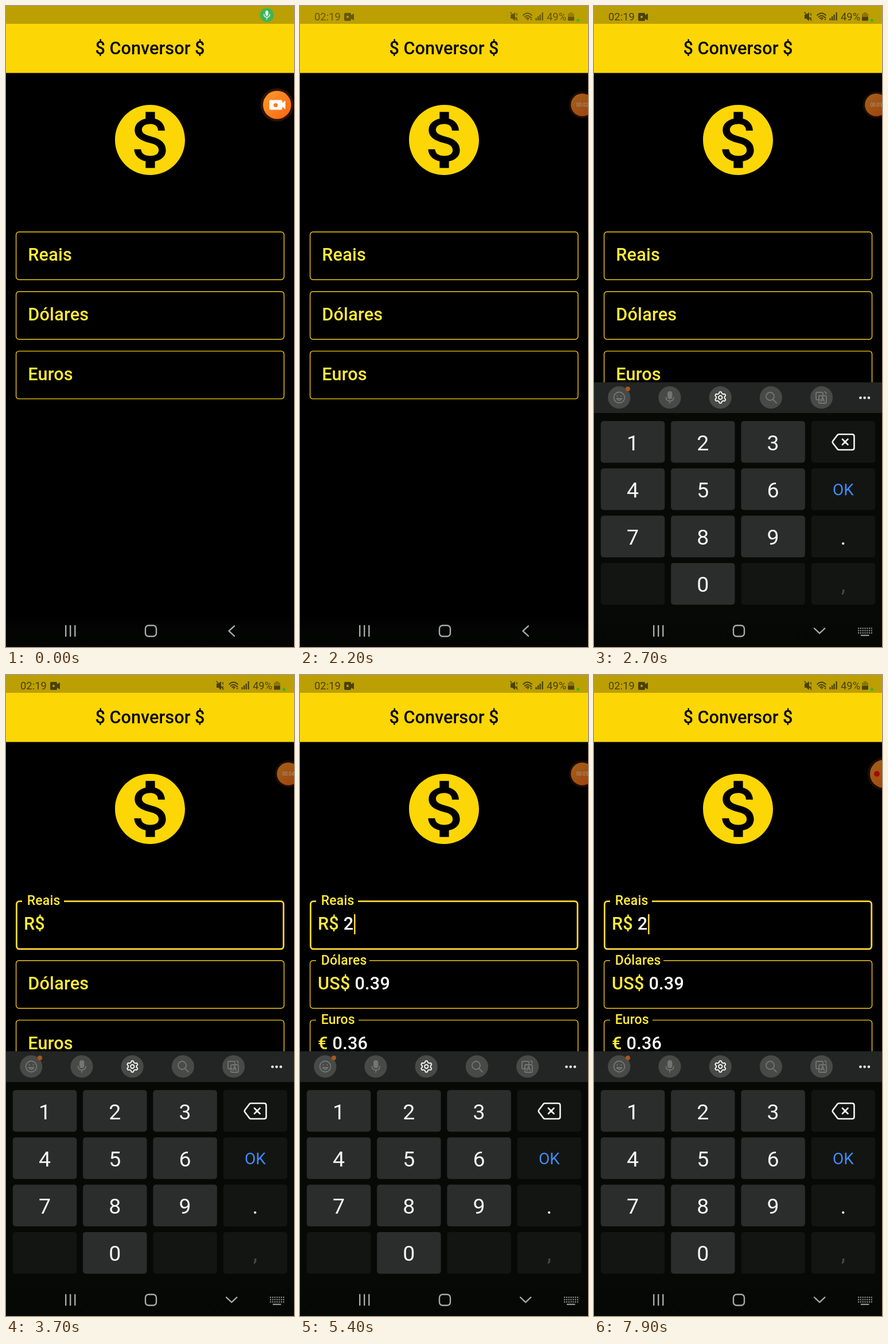
Write an HTML page that moves like this. It is 502 px wide and 1115 px high and loops after 8000 ms.

```html
<!DOCTYPE html>
<html lang="pt">
<head>
<meta charset="utf-8">
<title>Conversor</title>
<style>
  html, body { margin: 0; width: 100%; height: 100%; overflow: hidden; background: #000; }
  svg { display: block; width: 502px; height: 1115px; font-family: Roboto, "Noto Sans", sans-serif; }
  text { white-space: pre; }
  .big { font-size: 30.7px; font-weight: 500; letter-spacing: .2px; }
  .yellow { fill: #ffeb3b; }
  .line { fill: none; stroke-linecap: round; stroke-linejoin: round; }
</style>
</head>
<body>
<svg viewBox="0 0 502 1115">
  <defs>
    <linearGradient id="orange" x1="0" y1="0" x2="1" y2="1">
      <stop offset="0" stop-color="#ff9a2c"/><stop offset="1" stop-color="#fa6510"/>
    </linearGradient>
    <linearGradient id="shade" x1="0" y1="0" x2="0" y2="1">
      <stop offset="0" stop-color="#050705" stop-opacity="0"/>
      <stop offset=".5" stop-color="#050705" stop-opacity=".6"/>
      <stop offset="1" stop-color="#050705" stop-opacity=".7"/>
    </linearGradient>
  </defs>
  <rect width="502" height="1115"/>

  <rect width="502" height="116.5" fill="#fdd605"/>
  <rect width="502" height="31" fill="#bc9f02"/>
  <text x="251" y="84" text-anchor="middle" font-size="30.7" font-weight="500" fill="#0a0800">$ Conversor $</text>

  <g id="status" fill="#4b4109">
    <text x="25" y="24.5" font-size="18.4">02:19</text>
    <path d="M79 12h8q2 0 2 2v2l5-3v12l-5-3v2q0 2-2 2h-8q-2 0-2-2V14q0-2 2-2z"/>
    <circle cx="83" cy="19" r="2" fill="#bc9f02"/>
    <path d="M367 15h3l5-4v15l-5-4h-3z"/>
    <path class="line" d="M367 11l12 14M378 13v3M378 20v2" stroke="#4b4109" stroke-width="1.6"/>
    <path class="line" d="M389 16q7.500-7 15 0M391.500 19q5-4.500 10 0M394 21.500q2.500-2 5 0" stroke="#4b4109" stroke-width="1.8"/>
    <path d="M395 22.500h4l-2 2.500zM401 21l2-2.500 2 2.500zM401 22.500h4l-2 2.500z"/>
    <path d="M410.500 21h2.300v4h-2.300zM414 18h2.300v7H414zM417.500 15h2.300v10h-2.300zM421.500 11h2.300v14h-2.300z"/>
    <text x="430" y="24.500" font-size="18.400">49%</text>
    <path d="M470 11h5v2h1.500q1.500 0 1.500 1.500V24q0 1.500-1.500 1.500h-8Q467 25.500 467 24v-9.500Q467 13 468.500 13H470z" fill="#8c7607"/>
    <path d="M467 19h11v5q0 1.500-1.500 1.500h-8Q467 25.500 467 24z"/>
  </g>
  <g id="chip">
    <circle r="12.200" fill="#3cb558"/>
    <g id="mic" fill="#f0fff2">
      <rect x="-2.500" y="-7.500" width="5" height="9" rx="2.500"/>
      <path class="line" d="M-5-1q0 5 5 5t5-5M0 4v3.500" stroke="#e4f7e8" stroke-width="1.500"/>
    </g>
  </g>

  <path transform="translate(177.8 159.8) scale(6.1)" fill="#fdd605" d="M12 2C6.480 2 2 6.480 2 12s4.480 10 10 10 10-4.480 10-10S17.520 2 12 2zm1.410 16.090V20h-2.670v-1.930c-1.710-.36-3.160-1.460-3.270-3.400h1.960c.1 1.050.82 1.870 2.650 1.870 1.960 0 2.400-.98 2.400-1.590 0-.83-.44-1.610-2.670-2.140-2.480-.6-4.180-1.620-4.180-3.670 0-1.720 1.390-2.840 3.110-3.210V4h2.670v1.950c1.860.45 2.790 1.860 2.850 3.390H14.300c-.05-1.110-.64-1.870-2.220-1.870-1.500 0-2.400.68-2.400 1.640 0 .84.65 1.390 2.670 1.910s4.180 1.390 4.180 3.910c-.02 1.830-1.380 2.830-3.120 3.160z"/>

  <g id="fields"></g>
  <rect id="cursor" y="416" width="2.600" height="35" fill="#fdd835"/>

  <g id="board">
    <rect y="708" width="502" height="500" fill="#070907"/>
    <rect y="654.500" width="502" height="53.500" fill="#232524"/>
    <g id="tools"></g>
    <g class="line" stroke="#747674" stroke-width="1.800">
      <circle cx="44" cy="681" r="9.500"/>
      <path d="M39.500 683q4.500 6 9 0zM40.500 678v.5M47.500 678v.5"/>
      <rect x="129" y="671" width="6.500" height="12" rx="3.200" fill="#747674"/>
      <path d="M125.500 681q0 6 6.700 6t6.700-6M132.200 687v4"/>
      <circle cx="307" cy="679" r="7"/><path d="M312 684.500l6 6"/>
      <path d="M394 685h-5q-2 0-2-2v-9q0-2 2-2h8q2 0 2 2v2M394 678h9q2 0 2 2v9q0 2-2 2h-9q-2 0-2-2v-9q0-2 2-2zM395.500 688l3-8 3 8M396.500 685.500h4M402 671q3 1 2.500 4"/>
    </g>
    <g class="line" stroke="#f4f4f4" stroke-width="1.900">
      <path id="gear"/><circle cx="220.300" cy="681" r="3.200"/>
    </g>
    <circle cx="59" cy="666" r="4" fill="#a9561a"/>
    <g fill="#f4f4f4"><circle cx="464.500" cy="681.500" r="2.300"/><circle cx="471.700" cy="681.500" r="2.300"/><circle cx="479" cy="681.500" r="2.300"/></g>
    <g id="keys" text-anchor="middle"></g>
    <path class="line" stroke="#f6f6f6" stroke-width="2.600" d="M427 745h23q3.500 0 3.500 3.500v20q0 3.500-3.500 3.500h-23q-1.500 0-2.500-1l-8-10.500q-1.500-2 0-4l8-10.500q1-1 2.500-1zM433 753.500l9.500 9.500M442.500 753.500l-9.500 9.500"/>
  </g>

  <rect y="1060" width="502" height="55" fill="url(#shade)"/>
  <g class="line" stroke="#a9abaa" stroke-width="2.400">
    <path d="M104.200 1078v18M112.200 1078v18M120.300 1078v18"/>
    <rect x="243" y="1077.500" width="19" height="19" rx="5.500"/>
    <path id="back" d="M398 1078.500l-9.500 8.700 9.500 8.700"/>
    <path id="down" d="M384 1082.500l9.200 8.700 9.200-8.700"/>
  </g>
  <g id="switch" stroke="#969896" stroke-width="2.200" fill="none">
    <path d="M460 1082.500h25M460 1086.500h25M460 1090.500h25" stroke-dasharray="2.200 1.600"/>
    <path d="M465 1094.800h14.500"/>
  </g>

  <g id="badge">
    <circle r="29" fill="#2a1305"/>
    <circle r="24.500" fill="url(#orange)"/>
    <g id="camera">
      <path fill="#fff" d="M-12-8.500h19q2 0 2 2v3l5.500-4v15l-5.500-4v3q0 2-2 2h-19q-1.500 0-1.500-2v-13q0-2 1.500-2z"/>
      <circle cx="-2.500" cy=".5" r="3.600" fill="#fa7a1c"/>
    </g>
    <text id="clock" y="3.700" font-size="10.300" text-anchor="middle" fill="#fff3e6"></text>
    <circle id="rec" cx="-12.500" r="5" fill="#ff1010"/>
  </g>
</svg>
<script>
const LOOP = 8000;
const $ = id => document.getElementById(id);
const clamp = v => Math.max(0, Math.min(1, v));
const ramp = (t, a, b) => clamp((t - a) / (b - a));
const easeOut = p => 1 - (1 - p) ** 2;
const mix = (a, b, p) => a + (b - a) * p;
const show = (node, on) => node.setAttribute('opacity', +on);

function add(parent, tag, attrs, text = '') {
  const node = document.createElementNS('http://www.w3.org/2000/svg', tag);
  for (const k in attrs) node.setAttribute(k, attrs[k]);
  node.textContent = text;
  parent.append(node);
  return node;
}

const fields = [
  { name: 'Reais', prefix: 'R$ ', value: '2', gap: 73 },
  { name: 'Dólares', prefix: 'US$ ', value: '0.39', gap: 93 },
  { name: 'Euros', prefix: '€ ', value: '0.36', gap: 74 }
].map((f, i) => {
  const y = 393 + i * 103.7;
  const box = add($('fields'), 'rect', { x: 17.6, y, width: 467, height: 83, rx: 5, fill: 'none', stroke: '#f2ca14' });
  const hole = add($('fields'), 'rect', { y: y - 3, height: 7 });
  const label = add($('fields'), 'text', { class: 'big yellow' }, f.name);
  const line = add($('fields'), 'text', { class: 'big yellow', x: 31, y: y + 50.4 });
  add(line, 'tspan', {}, f.prefix);
  const value = add(line, 'tspan', { fill: '#fff' }, f.value);
  return { ...f, y, box, hole, label, line, value };
});

for (let i = 0; i < 5; i++)
  add($('tools'), 'circle', { cx: 43.8 + i * 88.2, cy: 681, r: 19.6, fill: '#484a48' });

// Six rounded teeth as a wavy ring
$('gear').setAttribute('d', Array.from({ length: 72 }, (_, i) => {
  const a = i * Math.PI / 36;
  const r = 8.5 + 1.3 * Math.tanh(2.5 * Math.cos(6 * a));
  return `${i ? 'L' : 'M'}${220.3 + r * Math.sin(a)} ${681 - r * Math.cos(a)}`;
}).join('') + 'Z');

const keys = {};
['1', '2', '3', 'del', '4', '5', '6', 'OK', '7', '8', '9', '.', 'l', '0', 'r', ','].forEach((name, i) => {
  const x = 11.8 + (i % 4) * 122.3, y = 722 + Math.floor(i / 4) * 82.3;
  const digit = /\d/.test(name);
  keys[name] = add($('keys'), 'rect', { x, y, width: 111.5, height: 72.5, rx: 5, fill: digit ? '#2b2d2c' : '#131513' });
  if (!digit && !['OK', '.', ','].includes(name)) return;
  const ok = name === 'OK';
  add($('keys'), 'text', {
    x: x + 55.7, y: y + (ok ? 47 : 50.5), 'font-size': ok ? 28 : 37.5,
    fill: ok ? '#3f8df5' : name === ',' ? '#484a48' : '#f6f6f6'
  }, name);
});

function drawField(f, p, filled, focus) {
  const w = mix(1.4, 2.8, focus);
  f.box.setAttribute('stroke-width', w);
  f.box.setAttribute('stroke', focus ? '#fdd835' : '#f2ca14');
  f.box.setAttribute('y', f.y + focus * .6);
  f.box.setAttribute('x', 17.6 + focus * .8);
  f.box.setAttribute('width', 467 - focus * 1.6);
  f.hole.setAttribute('x', 28);
  f.hole.setAttribute('width', f.gap * p);
  const scale = mix(1, .75, p);
  f.label.setAttribute('transform',
    `translate(${mix(38.2, 36.8, p)} ${f.y + mix(50.4, 6.8, p)}) scale(${scale})`);
  show(f.line, 0);
  f.line.setAttribute('opacity', p);
  f.value.setAttribute('fill-opacity', +filled);
}

const ticks = [200, 500, 1650, 2600, 3700, 4800, 5700, 6600, 7550];
const blinks = [3150, 3700, 4200, 4700, 5250, 5700, 6200, 6600, 7100, 7500, 7800];
const countPast = (list, t) => list.filter(v => t >= v).length;

function drawBadge(t) {
  const dock = easeOut(ramp(t, 1700, 2000));
  const hide = easeOut(ramp(t, 7700, 7880));
  const x = mix(mix(472.5, 492, dock), 505.5, hide);
  const scale = mix(mix(1, .81, dock), 1, hide);
  $('badge').setAttribute('transform', `translate(${x} 172) scale(${scale})`);
  $('badge').setAttribute('opacity', mix(1, .64, dock));
  const n = countPast(ticks, t);
  $('clock').textContent = n ? '00:0' + (n - 1) : '';
  show($('camera'), !n);
  show($('clock'), hide === 0);
  show($('rec'), hide > 0);
}

function draw(t) {
  const focus = easeOut(ramp(t, 3050, 3200));
  const fill = easeOut(ramp(t, 5250, 5390));
  const typed = t >= 5250;
  fields.forEach((f, i) => drawField(f, i ? fill : focus, typed, i ? 0 : focus));
  show($('cursor'), countPast(blinks, t) % 2);
  $('cursor').setAttribute('x', typed ? 94 : 76);

  const slide = easeOut(ramp(t, 2300, 2700));
  $('board').setAttribute('transform', `translate(0 ${461 * (1 - slide)})`);
  keys[2].setAttribute('fill', t >= 4800 && t < 5000 ? '#4a4c4b' : '#2b2d2c');
  const open = t >= 2300;
  show($('board'), open);
  show($('back'), !open);
  show($('down'), open);
  show($('switch'), open);

  $('status').setAttribute('opacity', ramp(t, 2050, 2250));
  const shrink = easeOut(ramp(t, 1050, 1350));
  $('chip').setAttribute('transform',
    `translate(${mix(454.7, 484.5, shrink)} ${mix(15.6, 25, shrink)}) scale(${mix(1, .2, shrink)})`);
  $('chip').firstElementChild.setAttribute('fill', shrink < 1 ? '#3cb558' : '#16c425');
  $('mic').setAttribute('opacity', 1 - ramp(t, 1050, 1200));
  drawBadge(t);
}

const start = performance.now();
function tick() {
  draw((performance.now() - start) % LOOP);
  requestAnimationFrame(tick);
}
tick();
</script>
</body>
</html>
```
